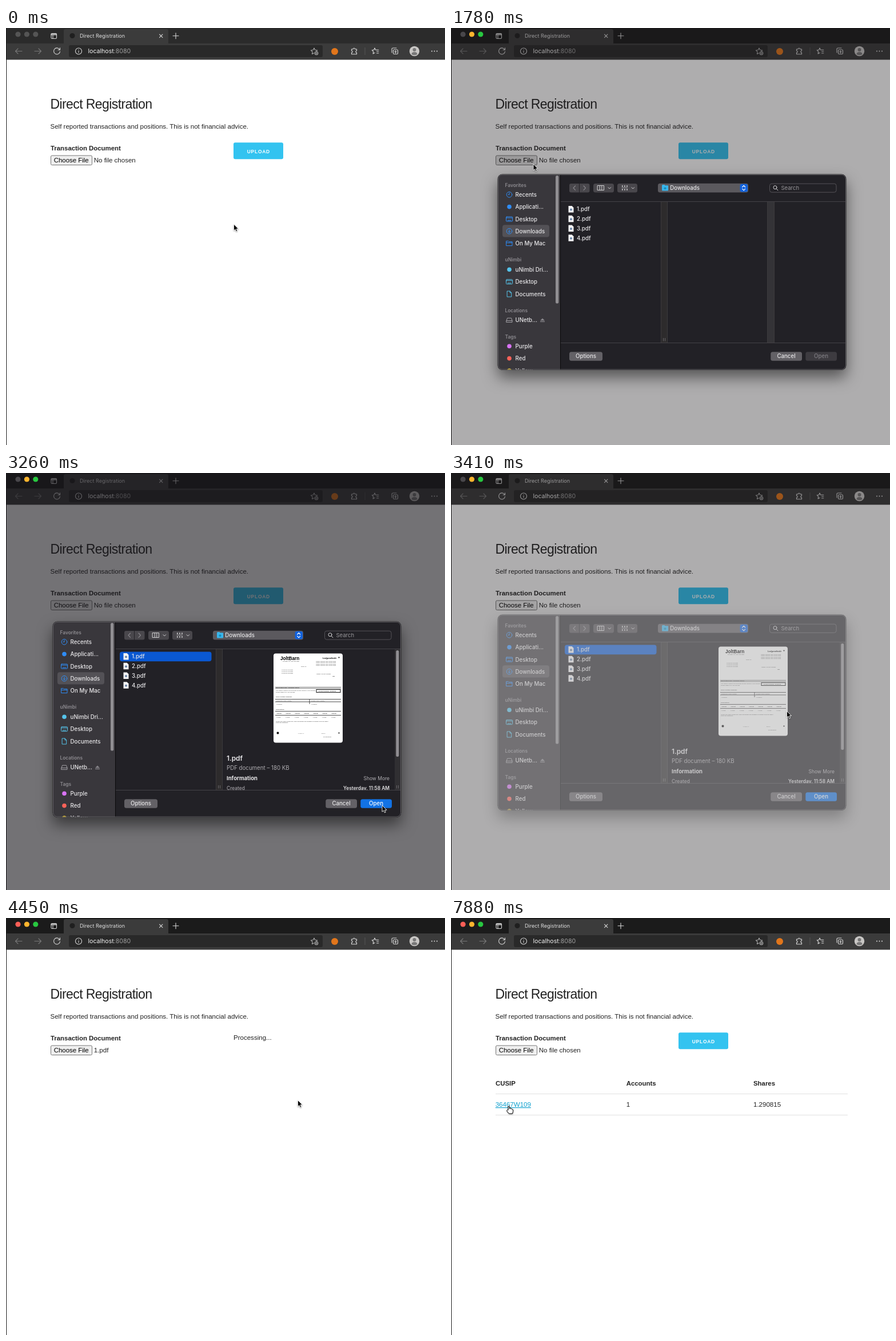
An HTML page that plays this animation: 768 by 729 pixels, repeating every 8 s.

```html
<!DOCTYPE html>
<html lang="en">
<head>
<meta charset="utf-8">
<title>Direct Registration</title>
<style>
  html, body { margin: 0; width: 100%; height: 100%; overflow: hidden; background: #fff; }
  svg { display: block; }
  text { white-space: pre; }
  .page text { font: 11.54px "Liberation Sans", Arial, sans-serif; fill: #222; }
  .page .bold { font-weight: 700; font-size: 11.4px; }
  .page .title { font-size: 23.07px; letter-spacing: -.615px; }
  .page .black { fill: #000; font-size: 11.45px; }
  .page .label { font-weight: 700; font-size: 8.46px; letter-spacing: .77px; fill: #fff; }
  .ui text { font-family: Inter, Roboto, sans-serif; }
  .ui .item { font-size: 9.7px; font-weight: 500; fill: #e9e8ea; }
  .ui .head { font-size: 8.4px; font-weight: 600; fill: #8d8b90; }
  .ui .mid { text-anchor: middle; }
  .ui .end { text-anchor: end; }
  .line { fill: none; stroke-linecap: round; stroke-linejoin: round; }
  #sheet { filter: drop-shadow(0 13px 13px rgba(0, 0, 0, .5)); }
  .paper text { font-family: "Liberation Sans", Arial, sans-serif; font-size: 2.4px; fill: #222; }
</style>
</head>
<body>
<svg width="768" height="729" viewBox="0 0 768 729">
  <defs>
    <clipPath id="sheetClip"><rect x="82" y="260" width="609" height="341.5" rx="8"/></clipPath>
    <clipPath id="previewClip"><rect x="378" y="308" width="312" height="246"/></clipPath>
  </defs>

  <g class="ui">
    <rect id="titleBar" width="768" height="27"/>
    <path d="M101 27V5q0-3 3-3H281q3 0 3 3V27H768V56H0V27Z" fill="#3b3b3b"/>
    <rect x="110" y="30" width="444" height="21" rx="3" fill="#292929"/>
    <g class="line" stroke="#d8d8d8" stroke-width="1.1">
      <rect x="79" y="9.5" width="9.5" height="9" rx="1.5"/>
      <path d="M79 12H88.5M82 12V18.500M79 10.800H88.500"/>
      <path d="M268.500 11.200l5.400 5.400m0-5.400l-5.400 5.400M297 8.700v10M292 13.700h10"/>
      <path d="M93.500 37.200A5.500 5.500 0 1 0 94.500 41M94.500 34.800v3.400h-3.400"/>
      <circle cx="127" cy="40.500" r="5.500"/><path d="M127 40v3M127 37.900v.1"/>
      <path d="M604.500 37h2.700a1.700 1.700 0 0 1 3.400 0h2.900v2.700a1.700 1.700 0 0 0 0 3.400v2.700h-9v-2.700a1.700 1.700 0 0 0 0-3.400z"/>
      <path d="M645 35l1.500 3.200h5.300M648.500 41h3.300M648.500 44h3.300M645 35l-1.400 3.200-3.400.5 2.500 2.600-.6 3.700 3-1.700"/>
      <rect x="677.500" y="38" width="8" height="7.500" rx="1.500"/>
      <path d="M675 43v-6q0-2 2-2h6M681.500 39.700v4M679.500 41.700h4"/>
    </g>
    <g class="line" stroke="#777" stroke-width="1.1">
      <path d="M28 40.500H16.500l4.500-4.500M16.500 40.500l4.500 4.500M50 40.500H61.500l-4.500-4.500M61.500 40.500l-4.500 4.500"/>
      <path d="M628 34.500v12" stroke="#555"/>
      <path d="M539 35l1.700 3.500 3.900.5-1.500 1.500M539 35l-1.700 3.500-3.900.5 2.800 2.700-.7 3.800 3-1.600" stroke="#aaa"/>
      <circle cx="543" cy="44" r="2.800" stroke="#aaa"/><path d="M543 42.700v2.600M541.700 44h2.600" stroke="#aaa"/>
    </g>
    <circle cx="116" cy="13.500" r="4.500" fill="#1f1f1f"/>
    <circle cx="575" cy="41" r="6" fill="#e2761b"/>
    <circle cx="714.500" cy="40.500" r="8.700" fill="#c9c7c5"/>
    <circle cx="714.500" cy="38" r="3" fill="#777"/><path d="M709.500 46q0-4 5-4t5 4q-5 3-10 0" fill="#777"/>
    <g fill="#ddd"><circle cx="745" cy="40.500" r="1"/><circle cx="749.500" cy="40.500" r="1"/><circle cx="754" cy="40.500" r="1"/></g>
    <text x="129" y="17" font-size="9.1" fill="#dedede">Direct Registration</text>
    <text x="143.500" y="44.300" font-size="10.600" fill="#f3f3f3">localhost<tspan fill="#a0a0a0">:8080</tspan></text>
  </g>

  <g class="page">
    <rect y="55.500" width="768" height="674" fill="#fff"/>
    <rect width="1" height="729" fill="#1c1c1c"/>
    <text class="title" x="77.500" y="141">Direct Registration</text>
    <text x="77.500" y="176">Self reported transactions and positions. This is not financial advice.</text>
    <text class="bold" x="78" y="214">Transaction Document</text>
    <rect id="choose" x="78.500" y="223" width="72" height="16.500" rx="2" stroke="#767676"/>
    <text class="black" x="83.700" y="235.300">Choose File</text>
    <text id="fileName" x="153.700" y="235.300"></text>
    <text id="processing" x="398" y="213">Processing...</text>
    <g id="upload">
      <rect id="uploadBox" x="398" y="200.300" width="87" height="29" rx="3"/>
      <text class="label" x="421.700" y="218.700">UPLOAD</text>
    </g>
    <g id="results">
      <text class="bold" x="78" y="293">CUSIP</text>
      <text class="bold" x="306.700" y="293">Accounts</text>
      <text class="bold" x="529" y="293">Shares</text>
      <path d="M78 307.500H694M78 344.500H694" stroke="#e1e1e1"/>
      <text id="link" x="77.700" y="330" text-decoration="underline">36467W109</text>
      <text x="306.700" y="330">1</text>
      <text x="529" y="330">1.290815</text>
    </g>
  </g>

  <rect id="dim" width="768" height="729" fill="#171519"/>
  <g id="lights"></g>

  <g id="sheet" class="ui">
    <rect id="blank" x="82" y="260" width="609" height="341.500" rx="8" fill="#fff" stroke="#333"/>
    <g id="dialog">
      <rect x="81.500" y="259.500" width="610" height="342.500" rx="8.500" fill="#0c0c0d"/>
      <g clip-path="url(#sheetClip)">
        <rect x="82" y="260" width="609" height="342" fill="#222126"/>
        <rect x="82" y="260" width="109" height="342" fill="#39373c"/>
        <path d="M191.500 260V602" stroke="#0b0b0c"/>
        <rect x="90" y="348.300" width="82" height="21.300" rx="4" fill="#535156"/>
        <g id="sidebar"></g>
        <rect x="183" y="262" width="5.300" height="223.500" rx="2.600" fill="#908e92"/>
        <rect x="367" y="308" width="11.500" height="246" fill="#2d2b2c"/>
        <rect x="553" y="308" width="12" height="246" fill="#343337"/>
        <path d="M367.500 308V554M378.500 308V554M553.500 308V554M565.500 308V554" stroke="#3c3a3d"/>
        <path d="M371.500 546v5.500M374.500 546v5.500" stroke="#68666a"/>
        <path d="M192 307.500H691M192 554.500H691" stroke="#444247"/>

        <path d="M210 276H224V291.500H210q-3 0-3-3V279q0-3 3-3ZM225 276H239.500q3 0 3 3v9.500q0 3-3 3H225Z" fill="#49474c"/>
        <g fill="#49474c">
          <rect x="249" y="276" width="36" height="15.500" rx="3.500"/><rect x="291" y="276" width="35" height="15.500" rx="3.500"/>
        </g>
        <g class="line" stroke="#88868b" stroke-width="1.200"><path d="M217.500 280l-3.500 3.700 3.500 3.700M232 280l3.500 3.700-3.500 3.700"/></g>
        <g class="line" stroke="#d5d4d6" stroke-width="1">
          <path d="M256.500 279.500h11v8h-11zM260.200 279.500v8M263.800 279.500v8M275 282.700l2.300 2.300 2.300-2.300M316 282.700l2.300 2.300 2.300-2.300"/>
          <path d="M299 280.500h10M299 286.500h10" stroke-width="2.600" stroke-dasharray="1.600 2.500" stroke-linecap="butt"/>
          <path d="M299 283.300h9.500" stroke-width=".6"/>
          <circle cx="567" cy="282.700" r="3"/><path d="M569.300 285l2.600 2.800"/>
        </g>
        <rect x="362" y="275.700" width="158" height="15.800" rx="3.500" fill="#5b595e"/>
        <path d="M369 279.500q0-1.500 1.500-1.500h3l1 1.300h4.500q1 0 1 1v7q0 1.200-1 1.200h-9q-1 0-1-1.200z" fill="#38b6ec"/>
        <circle cx="374.500" cy="284.200" r="2" fill="#168dbb"/>
        <text class="item" x="383.300" y="286.800">Downloads</text>
        <rect x="505.500" y="276.700" width="13.500" height="13.800" rx="3" fill="#1262dc"/>
        <path class="line" d="M509.700 282l2.500-2.600 2.500 2.600M509.700 285.200l2.500 2.600 2.500-2.600" stroke="#fff" stroke-width="1.200"/>
        <rect x="557.500" y="276.200" width="116.500" height="15" rx="3.500" fill="none" stroke="#545257"/>
        <text x="577.500" y="287" font-size="9.500" fill="#98969a">Search</text>

        <rect id="rowMark" x="199" y="312.500" width="160.500" height="16.700" rx="4" fill="#0a58d2"/>
        <g id="files"></g>

        <g id="preview" clip-path="url(#previewClip)">
          <rect x="379" y="308" width="301" height="246" fill="#222126"/>
          <rect x="680" y="308" width="11" height="246" fill="#302f32"/>
          <rect x="682.300" y="310" width="5" height="186" rx="2.500" fill="#908e92"/>
          <path d="M683.500 546v5.500M686.500 546v5.500" stroke="#68666a"/>
          <g class="paper" id="paper"><rect x="468" y="315.500" width="121" height="156" rx="4" fill="#fff"/></g>
          <text x="386" y="503.300" font-size="11.800" font-weight="600" fill="#e9e8ea">1.pdf</text>
          <text x="386" y="518.800" font-size="9.700" fill="#aeacb0">PDF document – 180 KB</text>
          <text x="386" y="537.300" font-size="9.500" font-weight="700" fill="#e9e8ea">Information</text>
          <text class="end" x="671" y="537.300" font-size="8.500" fill="#b1afb3">Show More</text>
          <text x="386" y="553.600" font-size="8.400" font-weight="500" fill="#a19fa4">Created</text>
          <text class="end" x="671" y="553.600" font-size="8.400" font-weight="600" fill="#e2e1e3">Yesterday, 11:58 AM</text>
        </g>

        <g fill="#636166">
          <rect x="207" y="570.300" width="58" height="15.500" rx="3.500"/><rect x="559.300" y="570.300" width="54.700" height="15.500" rx="3.500"/>
          <rect id="openBox" x="620.300" y="570.300" width="54.700" height="15.500" rx="3.500"/>
        </g>
        <text class="item mid" x="236" y="581.300">Options</text>
        <text class="item mid" x="586.500" y="581.300">Cancel</text>
        <text class="item mid" id="openText" x="647.500" y="581.300">Open</text>
      </g>
      <rect x="82.500" y="260.500" width="608" height="340.500" rx="7.500" fill="none" stroke="#626065"/>
    </g>
  </g>

  <g id="cursor" style="filter:drop-shadow(0 1px 1px rgba(0,0,0,.35))" stroke-linejoin="round">
    <path id="arrow" d="M0 0V11.300L2.600 8.900L4.300 12.900L6.300 12L4.600 8.200H8.100Z" fill="#000" stroke="#fff" stroke-width=".9"/>
    <path id="hand" d="M-.5 7V.8Q-.5-.3.600-.3T1.700.8V4.400Q3-.1+3.900 4.600Q5.500 3.800 6 5.200Q8 4.600 8 7V9.500L7 13H1L-2.600 8.700Q-3.400 7-2 6.500Z" fill="#fff" stroke="#000" stroke-width="1"/>
  </g>
</svg>
<script>
const $ = id => document.getElementById(id);
const LOOP = 8000, TICK = 148.5;

// Sidebar: [label, centre y, icon, colour]; entries without an icon are headings.
const BLUE = '#2f8cf5', CYAN = '#55c3ea', GREY = '#a3a1a6';
const sidebar = [
  ['Favorites', 278.5], ['Recents', 295.3, 'clock', BLUE], ['Applicati...', 316.6, 'dot', BLUE],
  ['Desktop', 338, 'screen', BLUE], ['Downloads', 359.2, 'down', BLUE], ['On My Mac', 380.6, 'folder', BLUE],
  ['uNimbi', 409.3], ['uNimbi Dri...', 426.3, 'dot', CYAN], ['Desktop', 447.6, 'screen', CYAN],
  ['Documents', 469, 'page', CYAN], ['Locations', 498], ['UNetb...', 514.6, 'drive', GREY],
  ['Tags', 543.7], ['Purple', 560.3, 'dot', '#d973f5'], ['Red', 581.6, 'dot', '#ff6259'], ['Yellow', 603, 'dot', '#fcd52f']
];
const icons = {
  clock: '<circle r="4.800"/><path d="M0-3V0H-2"/>',
  screen: '<rect x="-5.500" y="-4" width="11" height="8" rx="1"/><path d="M-5-2H5M-3 2.200H3"/>',
  down: '<circle r="4.800"/><path d="M0-2.500V2.200M-1.900.5L0 2.400L1.900.5"/>',
  folder: '<path d="M-5-4H-1.500L-.5-3H5V4H-5ZM-5-1.200H5"/>',
  page: '<path d="M-3.500-5H1L3.700-2.200V5H-3.500ZM1-5V-2.200H3.700"/>',
  drive: '<path d="M-5 1L-3.500-3.500H3.500L5 1V3.800H-5ZM-5 1H5"/>'
};
$('sidebar').innerHTML = sidebar.map(([label, y, icon, color]) => {
  if (!icon) return `<text class="head" x="94.500" y="${y + 3}">${label}</text>`;
  const mark = icon === 'dot' ? `<circle r="3.800" fill="${color}"/>` : `<g class="line" stroke="${color}">${icons[icon]}</g>`;
  return `<g transform="translate(102 ${y})">${mark}</g><text class="item" x="112.600" y="${y + 3.5}">${label}</text>`;
}).join('') + '<path d="M156 515.500l4-4 4 4zM156 516.700h8v1.200h-8z" fill="#88868b"/>';

$('files').innerHTML = [1, 2, 3, 4].map(n => {
  const y = 303.6 + n * 16.8;
  return `<path d="M205.500 ${y - 5.5}h6l3 3v8.500h-9z" fill="#f4f4f6"/><circle cx="210" cy="${y + 1}" r="2" fill="#6d87a8"/>
    <text class="item" x="220" y="${y + 3.7}">${n}.pdf</text>`;
}).join('');

const print = (x, y, text, style = '') => `<text x="${x}" y="${y}" style="${style}">${text}</text>`;
$('paper').innerHTML +=
  print(480, 327, 'JoltBarn', 'font-size:8.200px;font-weight:700;fill:#000') +
  print(484, 330, 'POWER TO THE HOLDER') +
  print(554, 325, 'Ledgerwhistle', 'font-size:3.600px;font-weight:700;font-style:italic;fill:#000') +
  [0, 1, 2, 3].map(i => print(542, 329.5 + i * 2.6, 'Holder services and contact desk')).join('') +
  print(516, 338.5, '0001770') +
  [0, 1, 2].map(i => print(482, 345 + i * 2.8, 'SAMPLE HOLDER')).join('') +
  print(543, 352, 'Holder Account Number') + print(571, 356, 'IND', 'font-weight:700') +
  '<path d="M471 375.500H586" stroke="#bbb" stroke-width="4"/>' +
  print(472, 376.4, 'Direct Stock Plan - Purchase Advice', 'font-weight:700;fill:#000') +
  print(472, 381, 'This advice confirms the purchase of plan shares in your account.') +
  print(472, 384, 'Please retain it for your records.') +
  '<rect x="543" y="378.500" width="42" height="5" fill="none" stroke="#111"/>' + print(546, 382, 'Account Number: 00000000', 'font-weight:700') +
  print(472, 392, 'Share Position Summary', 'font-weight:700') +
  '<path d="M471 395.500H586M471 400H586M531 395.500V404M471 416.500H586M471 423.500H586" stroke="#222" stroke-width=".8" fill="none"/>' +
  print(473, 399, 'Beginning Share Position') + print(534, 399, 'Ending Share Position') +
  print(473, 404.5, '0.000000') + print(534, 404.5, '1.290815') +
  print(472, 414, 'Transactions', 'font-weight:700') +
  [0, 1, 2, 3, 4, 5, 6].map(i => print(473 + i * 16, 421, 'Amount', 'font-weight:700') + print(473 + i * 16, 427.5, '1.2908')).join('') +
  print(472, 434.5, 'Shares are held in book-entry form and details are available on request from the agent.') +
  print(472, 437.2, 'Keep this statement.') +
  print(511, 455.5, '1 U D L T') + print(552, 455.5, 'D R S') + print(555, 462, '00-00000000') +
  '<path d="M474 453h3v3h-3zM581 454.500h3M582.500 453v3M581 322.500h3M582.500 321v3" stroke="#222" stroke-width=".7"/>';

// Pointer route: [tick, x, y]
const route = [
  [0, 398.5, 343], [2, 398, 343], [4, 340, 310], [6, 200, 250], [8, 147, 238], [9, 145, 238], [11, 144.5, 237.5],
  [13, 143.5, 238], [14, 143.5, 238], [16, 235, 318], [17, 240, 321], [18, 240, 321], [20, 560, 530], [21, 655, 578],
  [22, 658, 581], [24, 517, 251.5], [25, 440, 222], [26, 433, 218], [27, 431, 217], [29, 431, 217], [31, 590, 420],
  [32, 612, 449], [37, 612, 449], [38, 613, 449], [41, 612.5, 450], [44, 612, 449], [47, 612, 449], [49, 400, 385],
  [51, 130, 335], [53, 100.5, 329]
];
function pointerAt(tick) {
  const i = Math.max(1, route.findIndex(p => p[0] >= tick));
  const [a, b] = [route[i - 1], route[i]];
  const k = (tick - a[0]) / (b[0] - a[0]);
  return [a[1] + (b[1] - a[1]) * k, a[2] + (b[2] - a[2]) * k];
}

const show = (id, on) => $(id).style.display = on ? '' : 'none';
const set = (id, name, value) => $(id).setAttribute(name, value);

function draw(time) {
  const tick = Math.min(53, Math.floor((time + 14) / TICK));
  const within = (from, to) => tick >= from && tick < to;
  const active = tick >= 2, open = within(11, 24), dimmed = within(12, 24);
  const selected = tick >= 17, closing = tick === 23, hover = within(25, 29);

  set('titleBar', 'fill', active ? '#1b1b1b' : '#2b2b2b');
  const colors = active ? [dimmed ? '#49474b' : '#ff5f57', '#ffb52e', '#28c840'] : Array(3).fill('#555');
  $('lights').innerHTML = colors.map((c, i) => `<circle cx="${21 + i * 15.4}" cy="11" r="4.600" fill="${c}"/>`).join('');

  set('choose', 'fill', within(8, 15) ? '#e1e1e1' : '#efefef');
  $('fileName').textContent = within(25, 47) ? '1.pdf' : 'No file chosen';
  show('processing', within(29, 47));
  show('results', tick >= 47);
  set('link', 'style', `fill:${tick >= 52 ? '#0fa0ce' : '#1eaedb'}`);
  show('upload', !within(29, 47));
  set('uploadBox', 'fill', hover ? '#1eaedb' : '#33c3f0');

  set('dim', 'opacity', !dimmed ? 0 : tick === 12 || closing ? .35 : .6);
  show('sheet', open);
  show('blank', tick === 11);
  show('dialog', tick > 11);
  set('sheet', 'transform', `translate(0 ${tick === 11 ? -24.5 : tick === 12 ? -4 : closing ? -12 : 0})`);
  set('sheet', 'opacity', closing ? .5 : 1);
  show('rowMark', selected);
  show('preview', tick >= 18);
  set('openBox', 'fill', selected ? '#1272e4' : '#3d3b40');
  set('openText', 'style', `fill:${selected ? '#fff' : '#7f7d82'}`);

  const hand = hover || tick >= 52;
  show('arrow', !hand);
  show('hand', hand);
  set('cursor', 'transform', `translate(${pointerAt(tick)})`);
}

const start = performance.now();
function loop() {
  draw((performance.now() - start) % LOOP);
  requestAnimationFrame(loop);
}
loop();
</script>
</body>
</html>
```
